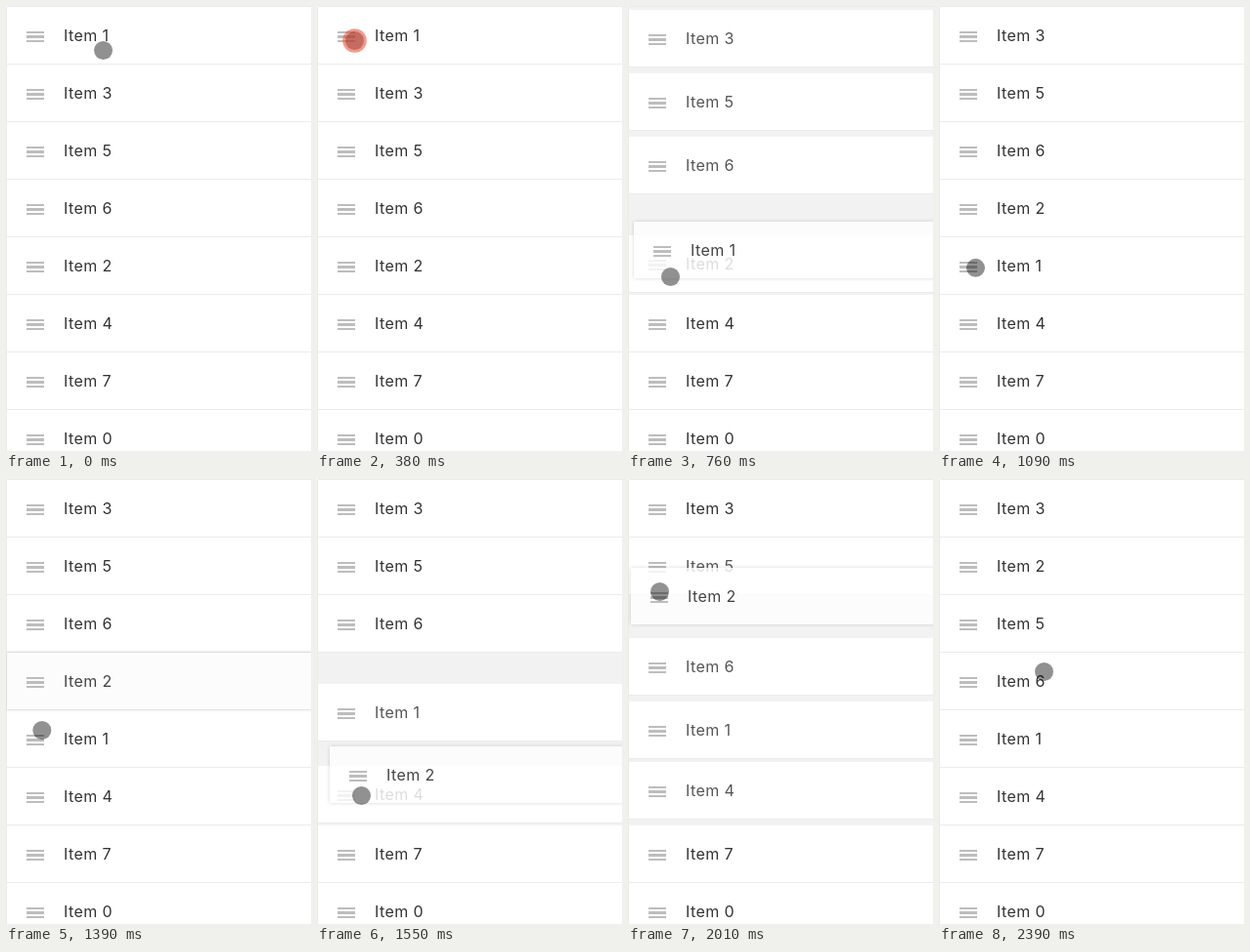
Recreate the animation shown at these times as an HTML page with a canvas. Size 312 by 456 pixels, loop 2.46 s.

```html
<!DOCTYPE html>
<html lang="en">
<head>
<meta charset="utf-8">
<title>Sortable list</title>
<style>
html, body { margin: 0; width: 100%; height: 100%; overflow: hidden; background: #fff; }
canvas { display: block; }
</style>
</head>
<body>
<canvas id="stage" width="312" height="456"></canvas>
<script>
const ctx = document.getElementById('stage').getContext('2d');
const W = 312, H = 456, ROW = 59, LOOP = 2460;
const STEP = LOOP / 32;   // the picture refreshes in even steps
const SLIDE = 260;        // a neighbour moving one slot
const SETTLE = 120;       // a dropped row reaching its slot
const LAG = 80;           // delay of a dragged row behind the pointer
const LINE = '#ebebeb';

const order = [1, 3, 5, 6, 2, 4, 7, 0];

// Each neighbour moves one slot, beginning at its own time
const shifts = [
  { by: -1, starts: { 3: 581, 5: 625, 6: 651, 2: 757, 1: 1466, 4: 1525 } },
  { by: 1, starts: { 4: 1835, 1: 1855, 6: 1881, 5: 1997 } }
];

const drags = [
  { item: 1, grab: 475, drop: 900, slots: 4 },
  { item: 2, grab: 1325, drop: 2110, slots: -2 }
];

// Pointer stops: time, x, y
const stops = [
  [0, 99, 45], [340, 38, 35], [475, 38, 35], [769, 43, 277], [1076, 37, 268],
  [1240, 30, 208], [1325, 30, 208], [1537, 45, 324], [1730, 45, 322],
  [1945, 32, 117], [1999, 32, 115], [2150, 33, 90], [2383, 107, 197]
];

const clamp = v => Math.min(1, Math.max(0, v));
const mix = (a, b, k) => a + (b - a) * k;

// cubic-bezier(.25, .1, .25, 1)
function ease(x) {
  if (x <= 0 || x >= 1) return clamp(x);
  let lo = 0, hi = 1, s = 0.5;
  for (let i = 0; i < 20; i++) {
    s = (lo + hi) / 2;
    if (0.75 * s * (1 - s) + s ** 3 < x) lo = s; else hi = s;
  }
  return 0.3 * s * (1 - s) ** 2 + 3 * s * s * (1 - s) + s ** 3;
}

function pointerAt(t) {
  const next = stops.findIndex(stop => stop[0] > t);
  if (next < 0) return stops[stops.length - 1].slice(1);
  const [t0, x0, y0] = stops[next - 1], [t1, x1, y1] = stops[next];
  const k = Math.sin((t - t0) / (t1 - t0) * Math.PI / 2);
  return [mix(x0, x1, k), mix(y0, y1, k)];
}

function dragOffset({ grab, drop, slots }, t) {
  if (t < grab) return [0, 0];
  const [gx, gy] = pointerAt(grab);
  const [px, py] = pointerAt(Math.min(t, drop) - LAG);
  const settled = ease((t - drop) / SETTLE);
  return [mix(px - gx, 0, settled), mix(py - gy, slots * ROW, settled)];
}

function rowState(item, slot, t) {
  const row = { item, x: 0, y: slot * ROW, moving: false, lifted: false };
  for (const { by, starts } of shifts) {
    if (!(item in starts)) continue;
    const p = (t - starts[item]) / SLIDE;
    row.y += by * ROW * ease(p);
    row.moving ||= p > 0 && p < 1;
  }
  const drag = drags.find(d => d.item === item);
  if (drag) {
    const [dx, dy] = dragOffset(drag, t);
    row.x += dx;
    row.y += dy;
    row.lifted = t > drag.grab && t < drag.drop + SETTLE - 5;
  }
  return row;
}

function drawCard(lifted) {
  if (!lifted) {
    ctx.fillStyle = '#fff';
    ctx.fillRect(1, 1, W, 58);
    ctx.fillStyle = LINE;
    ctx.fillRect(1, 59, W, 1);
    return;
  }
  // Shadow only outside the translucent card
  ctx.save();
  ctx.beginPath();
  ctx.rect(-20, -20, W + 40, ROW + 40);
  ctx.rect(1, 1, W, 58);
  ctx.clip('evenodd');
  ctx.shadowColor = 'rgba(0,0,0,.16)';
  ctx.shadowBlur = 4;
  ctx.fillStyle = '#fff';
  ctx.fillRect(1, 1, W, 58);
  ctx.restore();
  ctx.fillStyle = 'rgba(255,255,255,.8)';
  ctx.fillRect(1, 1, W, 58);
}

function drawRow({ item, x, y, moving, lifted }) {
  ctx.save();
  ctx.translate(Math.round(x), Math.round(y));
  drawCard(lifted);
  ctx.fillStyle = '#bdbdbd';
  ctx.fillRect(21, 26, 18, 2);
  ctx.fillRect(21, 30, 18, 3);
  ctx.fillRect(21, 35, 18, 2);
  ctx.fillStyle = lifted ? '#444' : moving ? '#555' : '#333';
  ctx.fillText('Item ' + item, 59, 36);
  ctx.restore();
}

function disc(x, y, r, color) {
  ctx.fillStyle = color;
  ctx.beginPath();
  ctx.arc(x, y, r, 0, Math.PI * 2);
  ctx.fill();
}

function drawPointer(t) {
  const [x, y] = pointerAt(t).map(v => v + 0.5);
  disc(x, y, 9.5, 'rgba(0,0,0,.43)');
  for (const { grab } of drags) {
    const p = (t - grab + 95) / 140;
    if (p >= 0 && p < 1) disc(x, y, 12 + 9 * p, `rgba(235,80,60,${0.6 * (1 - p)})`);
  }
}

function draw(t) {
  ctx.fillStyle = '#f2f2f2';
  ctx.fillRect(0, 0, W, H);
  ctx.fillStyle = LINE;
  ctx.fillRect(0, 0, W, 1);
  ctx.fillRect(0, 1, 1, H);
  ctx.font = '16px Inter, "Open Sans", sans-serif';
  ctx.letterSpacing = '0.4px';
  order.map((item, slot) => rowState(item, slot, t))
    .sort((a, b) => a.lifted - b.lifted || a.y - b.y)
    .forEach(drawRow);
  ctx.fillStyle = '#fff';
  ctx.fillRect(0, 0, 1, 1);
  drawPointer(t);
}

const origin = performance.now();
function frame() {
  const t = (performance.now() - origin) % LOOP;
  draw(Math.min(31, Math.floor((t + 12) / STEP)) * STEP);
  requestAnimationFrame(frame);
}
frame();
</script>
</body>
</html>
```
